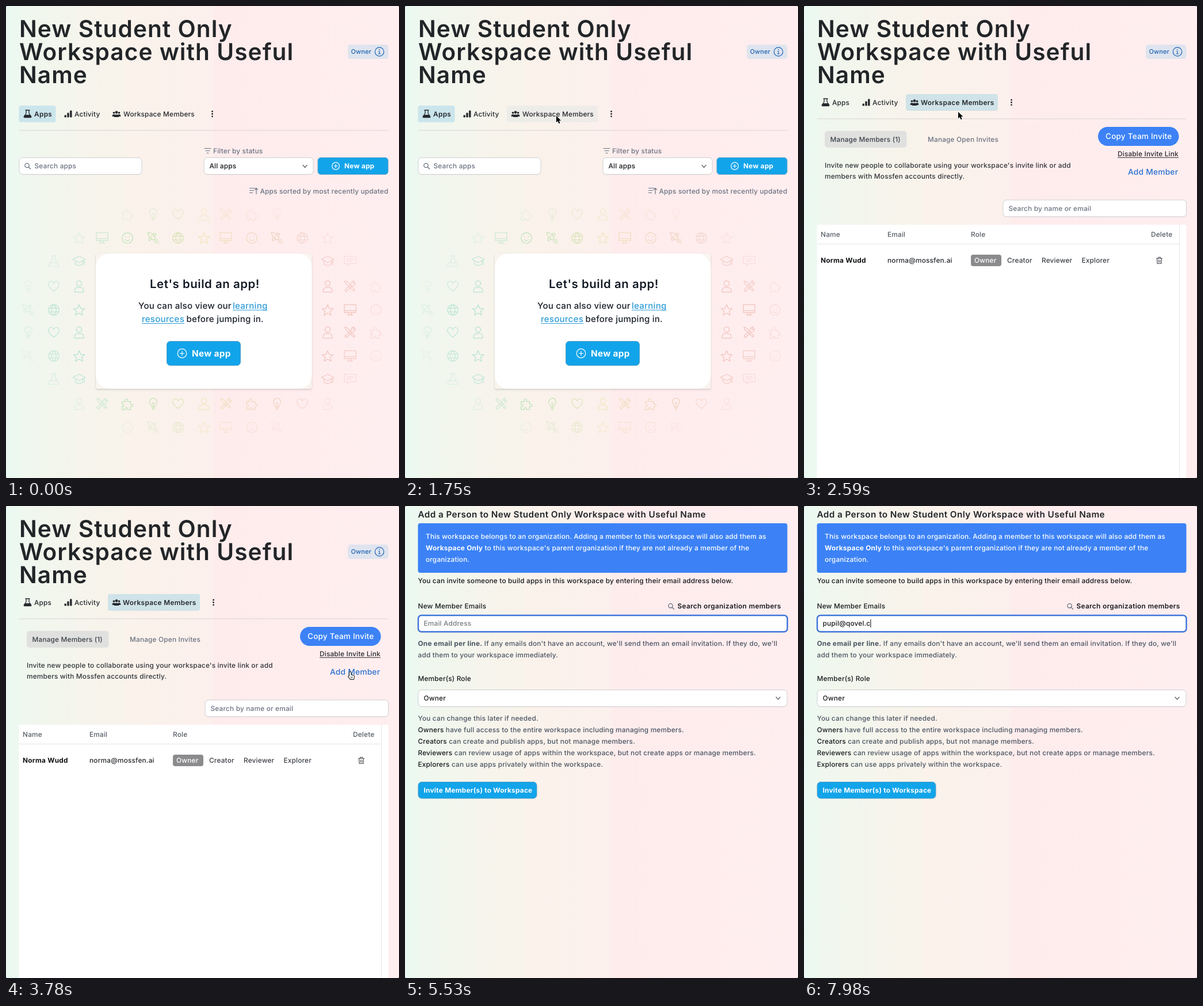
Recreate the animation shown at these times as an HTML page with a canvas. Size 683 by 820 pixels, loop 8000 ms.

```html
<!DOCTYPE html>
<html lang="en">
<head>
<meta charset="utf-8">
<title>Workspace members</title>
<style>
html, body { margin: 0; width: 100%; height: 100%; overflow: hidden; background: #fdeeee; }
canvas { display: block; width: 683px; height: 820px; font-family: Inter, sans-serif; }
</style>
</head>
<body>
<canvas id="stage"></canvas>
<script>
const W = 683, H = 820, LOOP = 8000, STEP = 70;
const canvas = document.getElementById('stage');
const ctx = canvas.getContext('2d');
const dpr = window.devicePixelRatio || 1;
canvas.width = W * dpr;
canvas.height = H * dpr;

const INK = '#25282d', DARK = '#16181c', GRAY = '#6b7280', SLATE = '#4b5563';
const SKY = '#12a4ea', SKY_EDGE = '#559fc6', BLUE = '#3c82f6', BODY = 11.6;
const TRACKING = { 500: 0.016, 600: 0.028, 700: 0.022 };

// ---------- helpers ----------
function text(str, x, y, color = INK, weight = 500, size = BODY) {
  const k = Math.ceil(size / 12);
  ctx.save();
  ctx.translate(x, y);
  ctx.scale(k, k);
  ctx.textRendering = 'geometricPrecision';
  ctx.font = `${weight} ${size * 1.02 / k}px Inter, sans-serif`;
  ctx.letterSpacing = `${size * TRACKING[weight] / k}px`;
  ctx.fillStyle = color;
  ctx.fillText(str, 0, 0);
  const width = ctx.measureText(str).width * k;
  ctx.restore();
  return width;
}

function runs(x, y, parts, size) {
  for (const [str, color, weight] of parts) x += text(str, x, y, color, weight, size);
}

function underlined(str, x, y, color, size) {
  const w = text(str, x, y, color, 500, size);
  box(x, y + 1.8, w, 1, 0, color);
  return w;
}

function box(x, y, w, h, r, fill, border, lineWidth = 1) {
  ctx.beginPath();
  ctx.roundRect(x, y, w, h, r);
  if (fill) { ctx.fillStyle = fill; ctx.fill(); }
  if (border) { ctx.strokeStyle = border; ctx.lineWidth = lineWidth; ctx.stroke(); }
}

function field(x, y, w, h) {
  box(x, y + 1, w, h, 6, 'rgba(0,0,0,.06)');
  box(x, y, w, h, 6, '#fff', '#cfcfd2');
}

function draw(path, x, y, { scale = 1, stroke, fill, width = 1.2 }) {
  ctx.save();
  ctx.translate(x, y);
  ctx.scale(scale, scale);
  ctx.lineJoin = ctx.lineCap = 'round';
  const p = new Path2D(path);
  if (stroke) { ctx.strokeStyle = stroke; ctx.lineWidth = width / scale; ctx.stroke(p); }
  if (fill) { ctx.fillStyle = fill; ctx.fill(p); }
  ctx.restore();
}

function disc(x, y, r, fill) {
  ctx.beginPath();
  ctx.arc(x, y, r, 0, 7);
  ctx.fillStyle = fill;
  ctx.fill();
}

function ring(x, y, r, color, width = 1.2) {
  ctx.beginPath();
  ctx.arc(x, y, r, 0, 7);
  ctx.strokeStyle = color;
  ctx.lineWidth = width;
  ctx.stroke();
}

function plusRing(x, y, r) {
  ring(x, y, r, '#fff', 1.2);
  draw('M-3 0H3M0-3V3', x, y, { scale: r / 6.5, stroke: '#fff', width: 1.2 });
}

function magnifier(x, y) {
  ring(x - 1, y - 1, 3.7, GRAY, 1.3);
  draw('M2 2l3 3', x, y, { stroke: GRAY, width: 1.4 });
}

const chevron = (x, y) => draw('M-3.5-2L0 2 3.5-2', x, y, { stroke: '#5b616b' });

// ---------- icon pattern, in 24-unit boxes ----------
const CIRCLE = 'M2 12a10 10 0 1 0 20 0a10 10 0 1 0-20 0z';
const ICONS = {
  S: 'M12 2l3 7 7.5.6-5.7 5 1.8 7.4L12 18l-6.6 4 1.8-7.4-5.7-5L9 9z',
  H: 'M12 21C5 16 2 12 2 8.5a5 5 0 0 1 10-1.5a5 5 0 0 1 10 1.5C22 12 19 16 12 21z',
  P: 'M12 11.5a5 5 0 1 0-.1 0zM3.5 23v-3a6 6 0 0 1 6-6h5a6 6 0 0 1 6 6v3z',
  G: CIRCLE + 'M12 2c-6 6-6 14 0 20c6-6 6-14 0-20zM3 8.5h18M3 15.5h18',
  F: CIRCLE + 'M8 15q4 4 8 0M8.5 9v1M15.5 9v1',
  M: 'M1 2h22v15H1zM1 13.5h22M9.5 17v4M14.5 17v4M7 21.5h10',
  B: 'M9 18c0-4-4-5-4-9.5a7 7 0 0 1 14 0c0 4.5-4 5.5-4 9.5zM9.5 20.5h5M10.5 23h3M12 18v-6M10 10l2 2 2-2',
  R: 'M1 1c7 1 12 5 15 11l-4 4C7 13 2 8 1 1zM7 11.5l-4 1 1 5 5-3M11.5 7l1-4 5 1-3 5M15 15l7 7M18 14l4 3M14 18l3 4M8 8l1.5 1.5',
  Z: 'M2 8h6c-2-7 6-7 4 0h6v5c6-2 6 6 0 4v6h-6c1-5-5-5-4 0H2v-6c5 1 5-5 0-4z',
  T: 'M2 2l5 1.5L21 19l-2 2L4 7zM20 2a5 5 0 0 0-6 6L2 19l3 3 11-11a5 5 0 0 0 6-6l-3 2-2-2z',
  L: 'M8 2h8M9.5 2v7L2 20q-1 2 2 2h16q3 0 2-2L14.5 9V2M6 15h12',
  C: 'M0 9l12-6 12 6-12 6zM5 12v6q7 5 14 0v-6M22 10v9',
  Q: 'M1 3h22v14H12l-5 4v-4H1zM6 8h12M6 12h9'
};
const COLS = [39, 83, 127, 167, 211, 256, 299, 344, 382, 427, 471, 515, 559, 598, 643];
const ROWS = [
  [362, '...TZBHPTZBH...'],
  [403, '.MSMFRGSMFRGSM.'],
  [443, '.LC.........CQ.'],
  [487, 'BHP.........PTZ'],
  [528, 'RGS.........SMF'],
  [567, 'BHP.........PTZ'],
  [608, 'RGS.........SMF'],
  [648, '.LC.........CQ.'],
  [691, '..PTZBHPTZBHPT.'],
  [732, '...MFRGSMFRG...']
];

function pattern() {
  for (const [y, row] of ROWS) {
    COLS.forEach((x, i) => {
      if (row[i] === '.') return;
      const far = Math.hypot((x - 344) / 320, (y - 547) / 205);
      const hue = x < 344 ? 155 - 100 * Math.max(0, (x - 130) / 214)
                          : 46 - 38 * Math.min(1, (x - 344) / 215);
      const sat = x < 344 ? 46 : 64, light = x < 344 ? 80 : 84;
      ctx.globalAlpha = Math.max(0, Math.min(1, (1.06 - far) / 0.26));
      draw(ICONS[row[i]], x - 11, y - 11, { scale: 0.92, stroke: `hsl(${hue} ${sat}% ${light}%)` });
    });
  }
  ctx.globalAlpha = 1;
}

// ---------- shared parts ----------
function backdrop() {
  const g = ctx.createLinearGradient(0, 0, W, 0);
  const stops = [[0, '#e9f9f1'], [.035, '#edf8f0'], [.04, '#f0f7ee'], [.18, '#f4f5ec'], [.185, '#f6f4ec'],
    [.303, '#f8f3eb'], [.306, '#faf2eb'], [.524, '#fcf0ec'], [.53, '#feeced'], [1, '#ffeeef']];
  for (const [at, color] of stops) g.addColorStop(at, color);
  ctx.fillStyle = g;
  ctx.fillRect(0, 0, W, H);
}

function corners() {
  for (const x of [0, W]) for (const y of [0, H]) {
    const sx = x ? -1 : 1, sy = y ? -1 : 1;
    draw(`M0 0h${2.5 * sx}q${-2.5 * sx} 0 ${-2.5 * sx} ${2.5 * sy}z`, x, y, { fill: '#777' });
  }
}

function header() {
  ['New Student Only', 'Workspace with Useful', 'Name'].forEach((line, i) =>
    text(line, 23, 54 + 40 * i, '#222528', 600, 39.8));
  box(594, 67, 70.5, 25, 5, '#dfe4ee');
  text('Owner', 599.5, 83.2, '#1d63b3', 500, 10.7);
  ring(649, 79.5, 7.7, '#1d63b3', 1.2);
  draw('M-1.2-1H0V3.5M-1.7 3.5H1.7', 649, 79.5, { stroke: '#1d63b3', width: 1.1 });
  disc(649, 75.8, 0.9, '#1d63b3');
}

function tabs(mid, members) {
  const base = mid + 4.3;
  if (members) box(177, mid - 14.5, 160, 29, 4, '#cfe3e8');
  else box(22.5, mid - 14.5, 64, 29, 4, '#cbe5ec');
  draw('M-3.5-6.5H3.5M-2.5-6V-1L-6 4q-1 2 1 2H5q2 0 1-2L2.5-1V-6', 37.5, mid, { stroke: INK, width: 1.3 });
  draw('M-4 1.5H4L6.5 5.5H-6.5z', 37.5, mid, { fill: INK });
  text('Apps', 49, base, INK, members ? 500 : 600);
  [4, 8, 12].forEach((h, i) => box(101.5 + 4.8 * i, mid + 6 - h, 3.4, h, 1, INK));
  text('Activity', 119, base);
  for (const dx of [-4.5, 4.5]) {
    disc(192 + dx, mid - 2, 1.8, INK);
    draw('M-2.7 4.5V3q0-2.2 2.7-2.2T2.7 3v1.5z', 192 + dx, mid, { fill: INK });
  }
  disc(192, mid - 2.8, 2.4, INK);
  draw('M-4 5.5V4q0-3 4-3t4 3v1.5z', 192, mid, { fill: INK });
  text('Workspace Members', members ? 203 : 204, base, INK, members ? 600 : 500);
  for (const dy of [-4.3, 0, 4.3]) disc(members ? 360.5 : 358.5, mid + dy, 1.4, INK);
  box(22.5, mid + 28, 642, 1, 0, '#d9d4d4');
}

// ---------- screens ----------
function appsScreen(t) {
  header();
  if (t >= 1540) box(177, 173, 158, 29, 4, 'rgba(222,228,228,.45)');
  tabs(187.5, false);

  draw('M0 0h11M2 4h7M4 8h3', 345, 247.5, { stroke: GRAY });
  text('Filter by status', 360, 255.6, GRAY);
  field(23, 263.5, 213, 29);
  magnifier(37.5, 278);
  text('Search apps', 49.5, 282.3, GRAY);
  field(344, 263.5, 190, 29);
  text('All apps', 353.5, 282.3, DARK);
  chevron(519.5, 278.5);
  box(542, 263.5, 122, 29, 5, SKY, SKY_EDGE);
  plusRing(573, 278, 6.4);
  text('New app', 588, 282.3, '#fff', 700);
  draw('M0 0h9M0 4h7M0 8h5M11.5 10V0M9 2.5l2.5-2.5 2.5 2.5', 423.5, 316.5, { stroke: GRAY });
  text('Apps sorted by most recently updated', 441.5, 325.5, GRAY);

  pattern();
  ctx.save();
  ctx.shadowColor = 'rgba(0,0,0,.16)';
  ctx.shadowBlur = 3;
  ctx.shadowOffsetY = 1.5;
  box(156, 430, 375.5, 235, 4, '#f9f4ef');
  ctx.restore();
  box(156, 430, 375.5, 235, 24, '#fff');
  text("Let's build an app!", 250, 489.5, '#131a26', 600, 20);
  const link = '#2f9dd8', size = 14.8;
  text('You can also view our', 230, 526, '#1b202a', 500, size);
  underlined('learning', 394, 526, link, size);
  underlined('resources', 236, 549.3, link, size);
  text('before jumping in.', 313.5, 549.3, '#1b202a', 500, size);
  box(279.5, 582.5, 128, 42, 6, SKY, SKY_EDGE);
  plusRing(306, 603.5, 7.8);
  text('New app', 323, 608.8, '#fff', 700, 15);
}

function membersScreen() {
  header();
  tabs(167.5, true);
  box(36, 217, 142.5, 29, 5, '#e0e1df');
  text('Manage Members (1)', 45.5, 235.8, '#3a3f47');
  text('Manage Open Invites', 215, 235.8, GRAY);
  box(511, 210, 140.5, 33, 16.5, BLUE);
  text('Copy Team Invite', 524, 231.3, '#fff', 500, 13.3);
  underlined('Disable Invite Link', 545, 261, INK);
  text('Add Member', 563, 293, '#2b70cf', 500, 13.5);
  text("Invite new people to collaborate using your workspace's invite link or add", 36, 280.6, '#30343a');
  text('members with Mossfen accounts directly.', 36, 300.4, '#30343a');
  field(346, 337, 318.5, 29);
  text('Search by name or email', 355.5, 355.8, GRAY);

  box(22.5, 380, 642, 440, 0, '#fff');
  box(652, 380, 1, 440, 0, '#e8e8ea');
  box(22.5, 413, 630, 1, 0, '#e4e5e8');
  const heads = { Name: 29, Email: 145, Role: 290, Delete: 603 };
  for (const name in heads) text(name, heads[name], 400.6, '#555b64');
  text('Norma Wudd', 29, 446.2, '#0d0f12', 700);
  text('norma@mossfen.ai', 145, 446.2);
  box(290, 432, 53, 20, 4, '#8b8b8e');
  text('Owner', 296, 446.2, '#fff');
  const roles = { Creator: 353, Reviewer: 413, Explorer: 482.5 };
  for (const name in roles) text(name, roles[name], 446.2, '#3a3e45');
  draw('M-5-3.5H5M-2-3.5V-5.5H2V-3.5M-4-3.5L-3.5 5.5H3.5L4-3.5M-1.3-1V3.5M1.3-1V3.5',
    617.5, 442, { stroke: '#4a4d53', width: 1.1 });
}

const ADDRESS = 'pupil@qovel.c';
const KEYS = [5600, 5740, 5880, 6020, 6160, 6860, 7210, 7350, 7420, 7490, 7630, 7840, 7980];
const FOCUS = 4830;

function caretOn(t) {
  return t < 5320 || (t >= 5600 && t < 6720) || t >= 6860;
}

function inviteScreen(t) {
  text('Add a Person to New Student Only Workspace with Useful Name', 22.5, 20.4, '#222528', 600, 15);
  box(22.5, 30, 642, 86, 4, BLUE);
  text('This workspace belongs to an organization. Adding a member to this workspace will also add them as', 36, 57.4, '#fff');
  runs(36, 77.2, [['Workspace Only', '#fff', 700],
    [" to this workspace's parent organization if they are not already a member of the", '#fff', 500]]);
  text('organization.', 36, 97.2, '#fff');
  text('You can invite someone to build apps in this workspace by entering their email address below.', 22.5, 133.6, DARK);
  text('New Member Emails', 22.5, 178.4, DARK);
  magnifier(462.5, 174.3);
  text('Search organization members', 473.5, 178.4, DARK, 600);

  field(23, 190, 641, 29);
  if (t >= FOCUS) box(23, 190, 641.5, 28.5, 5.5, '#fff', '#3f76dc', 2.5);
  const typed = ADDRESS.slice(0, KEYS.filter(k => k <= t).length);
  const end = 32.5 + (typed ? text(typed, 32.5, 208.3, DARK) : 0);
  if (!typed) text('Email Address', 32.5, 208.3, '#757a82');
  if (t >= FOCUS && caretOn(t)) box(end, 197, 1, 14, 0, '#000');

  runs(22.5, 243.4, [['One email per line.', SLATE, 700],
    [" If any emails don't have an account, we'll send them an email invitation. If they do, we'll", SLATE, 500]]);
  text('add them to your workspace immediately.', 22.5, 263.3, SLATE);
  text('Member(s) Role', 22.5, 303.5, DARK);
  field(23, 319.5, 641, 29);
  text('Owner', 32.5, 338.3, DARK);
  chevron(648.5, 334);
  text('You can change this later if needed.', 22.5, 373.3, SLATE);
  [['Owners', ' have full access to the entire workspace including managing members.'],
   ['Creators', ' can create and publish apps, but not manage members.'],
   ['Reviewers', ' can review usage of apps within the workspace, but not create apps or manage members.'],
   ['Explorers', ' can use apps privately within the workspace.']
  ].forEach(([role, rest], i) => runs(22.5, 393.2 + 19.9 * i, [[role, DARK, 500], [rest, SLATE, 500]]));
  box(23, 479.5, 206, 28.5, 6, SKY, SKY_EDGE);
  text('Invite Member(s) to Workspace', 32.5, 497.7, '#fff', 700);
}

// ---------- pointer ----------
const TRACK = [
  [70, 653, 806], [350, 650, 600], [630, 640, 440], [840, 597, 385], [980, 409, 404],
  [1120, 320, 290], [1260, 282, 226], [1400, 282, 218], [1680, 262, 192], [2170, 268, 184],
  [2730, 268, 184], [2870, 390, 222], [3080, 583, 275], [3220, 583, 275], [3430, 597, 289],
  [4130, 597, 289], [4340, 470, 250], [4620, 250, 208], [4830, 217, 204], [5530, 217, 204]
];

function pointer(t) {
  const i = TRACK.findIndex(k => k[0] > t);
  if (i < 1) return;
  const [t0, x0, y0] = TRACK[i - 1], [t1, x1, y1] = TRACK[i];
  const u = (t - t0) / (t1 - t0);
  const x = x0 + (x1 - x0) * u, y = y0 + (y1 - y0) * u;
  if (t >= 3290 && t < 4060) {
    draw('M2 2c0-2.3 2.4-2.3 2.4 0v3.5l4 1c1.5.4 1.7 1.5 1.4 3L9 13H4L.5 9c-1-1.7.4-2.5 1.5-1.2z',
      x - 2, y - 1, { stroke: '#111', fill: '#fff', width: 2 });
    draw('M4.7 8.5v2.5M6.7 8.5v2.5', x - 2, y - 1, { stroke: '#222', width: 0.8 });
  } else if (t >= 4060 && y < 219) {
    const beam = 'M-2-6.5Q0-6.5 0-5Q0-6.5 2-6.5M0-5V5M-2 6.5Q0 6.5 0 5Q0 6.5 2 6.5';
    draw(beam, x, y, { stroke: '#fff', width: 2.4 });
    draw(beam, x, y, { stroke: '#111', width: 1 });
  } else {
    draw('M0 0V11.5L2.7 9.1 4.6 13.3 6.6 12.4 4.8 8.3H8.4z', x, y, { stroke: '#fff', fill: '#000', width: 1.6 });
  }
}

function render(now) {
  const t = Math.floor((now % LOOP) / STEP) * STEP;
  ctx.setTransform(dpr, 0, 0, dpr, 0, 0);
  backdrop();
  if (t < 2590) appsScreen(t);
  else if (t < 4060) membersScreen();
  else inviteScreen(t);
  pointer(t);
  corners();
}

const start = performance.now();
function tick() {
  render(performance.now() - start);
  requestAnimationFrame(tick);
}
tick();
</script>
</body>
</html>
```
